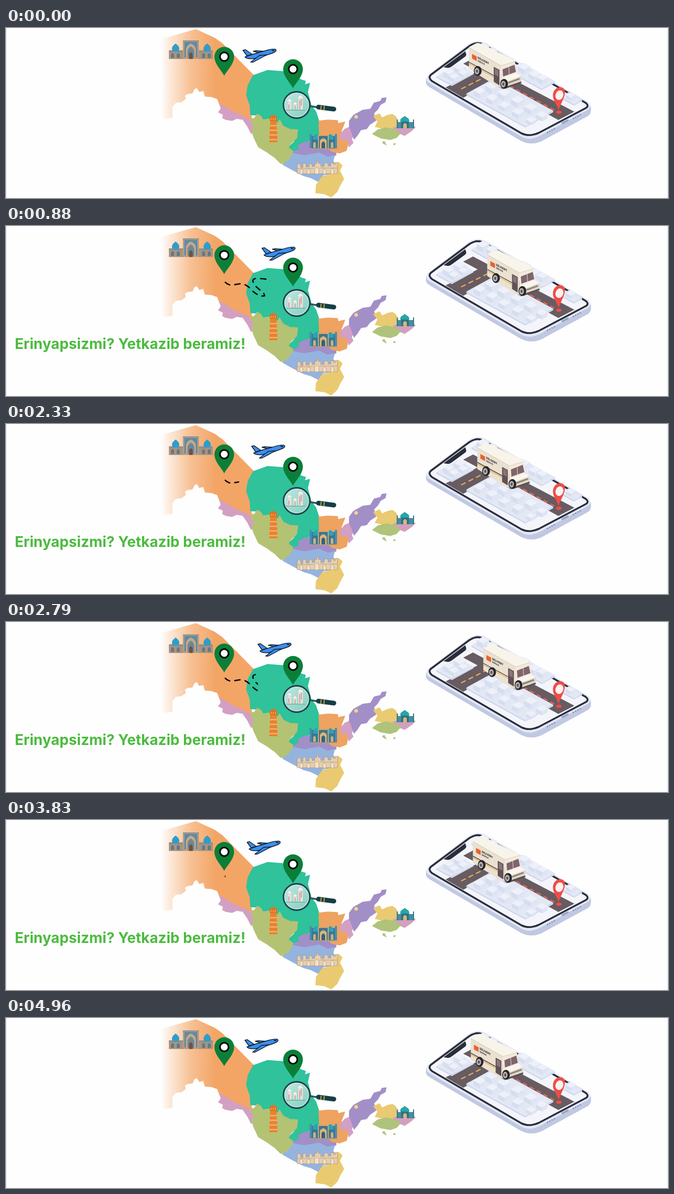
An HTML page that plays this animation: 1280 by 329 pixels, repeating every 5000 ms.

```html
<!DOCTYPE html>
<html lang="uz">
<head>
<meta charset="utf-8">
<title>Yetkazib berish</title>
<style>
html, body { margin: 0; width: 100%; height: 100%; overflow: hidden; background: #fefefe; }
svg { display: block; width: 100%; height: 100%; }
#slogan { font: 700 28.2px Inter, "Open Sans", sans-serif; fill: #4cbb3f; }
#map { stroke-width: 1.5; stroke-linejoin: round; }
.sign { font: 800 5.6px Inter, Roboto, sans-serif; fill: #2c2a30; }
</style>
</head>
<body>
<svg viewBox="0 0 1280 329" preserveAspectRatio="none">
<defs>
  <linearGradient id="fade" gradientUnits="userSpaceOnUse" x1="300" y1="0" x2="405" y2="0">
    <stop offset="0" stop-color="#fefefe"/><stop offset=".12" stop-color="#fdeee2"/>
    <stop offset=".55" stop-color="#f7c093"/><stop offset="1" stop-color="#f3a566"/>
  </linearGradient>
  <linearGradient id="glass" x1="0" y1="0" x2="1" y2="1">
    <stop offset="0" stop-color="#c5e6e0"/><stop offset="1" stop-color="#7fcfbd"/>
  </linearGradient>
  <clipPath id="wipe"><rect id="edge" x="400" y="90" width="0" height="60"/></clipPath>
  <g id="pin">
    <path d="M0 37C-4 28-19 15-19 0A19 19 0 0 1 19 0C19 15 4 28 0 37Z" fill="#0b7f38"/>
    <circle r="8.3" fill="#fff" stroke="#0a0a0a" stroke-width="3.2"/>
  </g>
  <g id="wheel">
    <ellipse rx="7.5" ry="9.5" fill="#26242a"/>
    <ellipse cx="-1.5" cy=".5" rx="4.5" ry="6.3" fill="#b9b4b4"/>
    <ellipse cx="-1.5" cy=".5" rx="2" ry="3" fill="#5b5558"/>
  </g>
</defs>

<path d="M.5 0V329M1279.5 0V329" stroke="#dcdcef"/>

<g id="map"></g>
<circle cx="677" cy="172" r="3.5" fill="#f3d684"/>

<!-- palace with two blue domes -->
<g>
  <path d="M315 43H342V60H315ZM373 43H400V60H373Z" fill="#a9947f"/>
  <path d="M342 24H373V60H342Z" fill="#b79c80"/>
  <path d="M345 27H370V57H345Z" fill="#5f8ba6"/>
  <path d="M348 58V40Q350 33 357.500 30Q365 33 367 40V58Z" fill="#c6a988"/>
  <path d="M351 58V44Q353 38 357.500 36Q362 38 364 44V58Z" fill="#6f8797"/>
  <path d="M354 60V50Q357.500 44 361 50V60Z" fill="#6d5546"/>
  <path d="M322 45C319 37 323 34 328 30C333 34 337 37 334 45ZM383 45C380 37 384 34 389 30C394 34 398 37 395 45Z" fill="#2f9dca"/>
  <path d="M319 58V51Q322 46 325 51V58ZM330 58V51Q333 46 336 51V58ZM379 58V51Q382 46 385 51V58ZM390 58V51Q393 46 396 51V58Z" fill="#64798a"/>
  <path d="M315 46H342M373 46H400M342 25H373" stroke="#7d8f9a" stroke-width="1.500"/>
</g>

<!-- minaret -->
<g>
  <path d="M511 178H523L525 221H509Z" fill="#e8822d"/>
  <path d="M510 171L517 168L524 171V180H510Z" fill="#de7423"/>
  <path d="M510.500 189H523.500M510 198H524M509.500 207H524.500M509 216H525" stroke="#f2b27a" stroke-width="2.500"/>
  <path d="M512 176H522" stroke="#f0a35e" stroke-width="3" stroke-dasharray="2 2"/>
</g>

<!-- blue ensemble -->
<g>
  <path d="M588 209H639V234H588Z" fill="#3a7894"/>
  <path d="M587 205H591V234H587ZM636 205H640V234H636Z" fill="#4a8db0"/>
  <path d="M594 216C591 210 596 208 600 205C604 208 609 210 606 216ZM621 216C618 210 623 208 627 205C631 208 636 210 633 216Z" fill="#2ba2b8"/>
  <path d="M603 207H624V234H603Z" fill="#d9a55e"/>
  <path d="M605 209H622V233H605Z" fill="#3d7594"/>
  <path d="M607 234V218Q613.500 209 620 218V234Z" fill="#d8b679"/>
  <path d="M610 234V223Q613.500 216 617 223V234Z" fill="#35617f"/>
  <path d="M594 232V223Q596.500 218 599 223V232ZM628 232V223Q630.500 218 633 223V232Z" fill="#c9b184"/>
  <path d="M587 233.500H640" stroke="#b99e72" stroke-width="1.500"/>
</g>

<!-- old town skyline -->
<g stroke="#a98b6c" stroke-width=".7">
  <path d="M563 282V266L566 261L570 266V270H574V262H580V269H586V265Q589 259 592 265V268H597V262H601V257H604V262H609V268H615V264Q619 257 623 264V267H628V261H633V264H637V260H641V282Z" fill="#e6cfb1"/>
  <path d="M568 282V275Q571 271 574 275V282M582 282V275Q585 271 588 275V282M597 282V273Q601 267 605 273V282M613 282V275Q616 271 619 275V282M628 282V274Q631 270 634 274V282M563 272H596M606 271H641" fill="#f2e2c8"/>
</g>

<!-- teal mosque -->
<g>
  <path d="M756 182H789V194H756Z" fill="#478e9d"/>
  <path d="M763 182C760 175 767 174 771 170C775 174 782 175 779 182Z" fill="#27a6a9"/>
  <path d="M756.500 177V194M788 177V194" stroke="#2b7b8c" stroke-width="2"/>
  <path d="M764 181H779V194H764Z" fill="#2f7187"/>
  <path d="M768 194V187Q771.500 181 775 187V194Z" fill="#d7b779"/>
</g>

<!-- phone -->
<g stroke-linejoin="round">
  <path d="M812 98V106Q813 112 823 117L995 218Q1014 228 1034 220L1124 171Q1131 167 1131 160V152Z" fill="#c0c8e2"/>
  <path d="M816 91L893 32Q911 20 928 29L1124 142Q1136 151 1124 159L1032 209Q1012 219 996 210L819 107Q808 100 816 91Z" fill="#e4e7f5"/>
  <path d="M821 91L896 35Q911 25 925 33L1121 145Q1128 151 1121 155L1030 203Q1012 211 997 204L824 103Q816 97 821 91Z" fill="#f4f5fb" stroke="#2a2d3a" stroke-width="3.600"/>
  <path d="M846 76L888 45L890 51Q890 54 887 56L861 75Q856 78 853 77Z" fill="#2a2d3a"/>
  <path d="M992 72L1003 78.500" stroke="#2a2d3a" stroke-width="5"/>
  <path d="M850 115L884 135L938 107L1068 178L1099 162L903 59L884 69L912 84Z" fill="#665c61"/>
  <path d="M880 118L934 91" stroke="#f0a55b" stroke-width="2.400" stroke-dasharray="10 6"/>
  <path d="M934 90L1066 162" stroke="#ef6454" stroke-width="2.400" stroke-dasharray="9 6"/>
  <g id="blocks"></g>
  <path d="M1076 184L1086 179" stroke="#9ba4c6" stroke-width="4" stroke-linecap="round"/>
  <path d="M1047 202L1062 194M1097 175L1114 166" stroke="#8790b5" stroke-width="3" stroke-linecap="round" stroke-dasharray="0 5"/>
</g>
<ellipse cx="1069" cy="163" rx="5.500" ry="3.200" fill="#ef4d47"/>

<g id="truck" stroke-linejoin="round">
  <path d="M897 79L960 119L998 104L940 80Z" fill="#463f45" opacity=".4"/>
  <path d="M895 37L908 30Q912 28 917 30L981 61Q985 63 984 67L956 77Z" fill="#f8f4ea"/>
  <path d="M895 37L957 72V115L949 113L895 79Z" fill="#eae1d1"/>
  <path d="M957 74L984 65L988 88L995 93V106L963 117L957 113Z" fill="#f2eadc"/>
  <path d="M960 80L983 71L986 85L961 94Z" fill="#80656c"/>
  <path d="M972 75L973 90" stroke="#e9dfce"/>
  <path d="M961 96L987 87L996 93L967 104Z" fill="#faf6ee"/>
  <path d="M967 104L996 93V102L966 113Z" fill="#e0d6c5"/>
  <path d="M943 75L954 81V111L943 104Z" fill="#5f5156"/>
  <path d="M945 78L952 82V94L945 90Z" fill="#8d747a"/>
  <path d="M895 66L943 92" stroke="#3a3437" stroke-width="1.300"/>
  <path d="M895 69L943 95" stroke="#eaa74a" stroke-width="1.200"/>
  <path d="M895 38L957 73L984 65" fill="none" stroke="#d6cbb9"/>
  <path d="M971 106L993 98" stroke="#8a7f7a" stroke-width="3"/>
  <path d="M964 116L996 105" stroke="#5a5152" stroke-width="3.500"/>
  <use href="#wheel" x="912" y="83"/><use href="#wheel" x="963" y="108"/>
  <path d="M901 50L910 55V64L901 59Z" fill="#e8622f"/>
  <g class="sign" transform="matrix(.78 .42 0 1 912 59)"><text>DELIVERY</text><text y="5.500" font-size="4">SERVICE</text></g>
</g>

<path d="M1068 159C1067 149 1055 139 1058 126C1061 115 1073 111 1079 118C1085 127 1074 144 1068 159Z" fill="#ef4d47"/>
<ellipse cx="1070" cy="130" rx="7.500" ry="9.500" transform="rotate(18 1070 130)" fill="#fbf3f1"/>

<!-- magnifier -->
<g>
  <path d="M587 151L606 154" stroke="#35555c" stroke-width="3.500"/>
  <path d="M604 153L634 157" stroke="#153f45" stroke-width="9" stroke-linecap="round"/>
  <path d="M609.500 150L608.500 159M615.500 150.500L614.500 160" stroke="#d9b75b" stroke-width="1.700"/>
  <circle cx="562" cy="149" r="25.500" fill="url(#glass)" stroke="#203d49" stroke-width="2.800"/>
  <circle cx="562" cy="149" r="23" fill="none" stroke="#d7f0ea" stroke-opacity=".45" stroke-width="2"/>
  <path d="M545 158V143H552V158ZM565 158V134H574V158ZM556 158V147H562V158Z" fill="#e6e0dd"/>
  <path d="M544 142L548 137L553 142ZM564 135L569 130L575 135ZM555 147L559 143L563 147Z" fill="#f4f4f1"/>
  <path d="M547 148V157M568 140V157M571 137V150M559 150V158" stroke="#cf9a97" stroke-width="1.800"/>
  <path d="M542 159H578" stroke="#76bdae" stroke-width="2"/>
</g>

<path clip-path="url(#wipe)" d="M424 109C433 118 441 113 451 112C463 111 470 118 476 125C485 133 491 137 500 135C500 128 487 123 480 113C472 100 484 101 495 102C511 103 515 108 520 116C526 128 538 134 556 134" fill="none" stroke="#080808" stroke-width="2.600" stroke-linecap="round" stroke-dasharray="10 10"/>

<g id="pins"><use href="#pin" x="422" y="55.500"/><use href="#pin" x="555" y="79.500"/></g>

<g id="plane" stroke="#101622" stroke-width="1.400" stroke-linejoin="round" fill="#3a8fee">
  <path d="M489 48L478 45L483 44L499 45Z"/>
  <path d="M466 54L458 43L463 42L476 51Z"/>
  <path d="M462 56Q478 50 494 46Q512 40 520 41Q525 43 519 47Q502 54 480 59Q466 61 462 56Z"/>
  <path d="M490 53L473 66L478 66L504 52Z"/>
  <path d="M514 43L519 44" stroke="#0c1c38" stroke-width="2"/>
</g>

<text id="slogan" x="17" y="238.300" opacity="0">Erinyapsizmi? Yetkazib beramiz!</text>
</svg>

<script>
const $ = id => document.getElementById(id);
const LOOP = 5000;

// Regions: fill and outline
const regions = [
  ['url(#fade)', 'M300 22L367 3L404 20L418 30L481 94L468 112L466 130L473 148L474 170L479 188L458 173L440 165L425 156L413 148L409 137L398 133L385 132L382 121L374 123L369 115L364 118L360 126L351 127L345 131L347 137L339 143L328 144L321 153V173L311 175L300 174Z'],
  ['#d39fc2', 'M413 147L425 154L440 163L458 171L468 175L475 179L480 199L474 204L467 190L458 177L446 175L437 179L425 177L419 174L420 167L411 163L416 156Z'],
  ['#2fc29b', 'M478 92L506 82L545 85L570 100L579 103L577 110L587 107L583 124L590 150L599 162L605 180L606 206L592 215L577 223L566 237L552 240L545 231L556 222L562 213L565 198L548 195L537 190L528 178L524 184L498 179L492 169L473 168L472 150L465 130L468 111Z'],
  ['#b4c274', 'M472 178L481 174L485 167L492 170L497 178L508 176L526 184L529 178L536 190L549 196L564 197L562 213L549 225L546 232L557 240L552 249L540 262L531 262L520 251L503 239L488 230L480 213L476 202L479 188Z'],
  ['#a28fc8', 'M555 240L566 236L566 227L577 221L592 220L606 207L625 231L638 235L638 246L622 250L606 243L585 248L560 246Z'],
  ['#eea361', 'M605 180L622 178L641 179L642 185L655 182L648 200L650 211L662 221L658 237L645 242L630 239L620 229L606 207Z'],
  ['#d2a0c4', 'M646 206L655 196L668 190L674 204L668 215L671 222L663 230L661 218L646 213Z'],
  ['#a28fc8', 'M664 191L664 180L672 169L690 159L705 157L712 145L724 142L727 136L735 135L733 143L724 148L718 158L711 165L715 179L703 187L697 195L686 197L679 208L673 215L669 203Z'],
  ['#eaca72', 'M711 171L722 166L727 174L738 169L747 167L753 171L758 180L756 192L740 195L729 194L714 191L719 181Z'],
  ['#d39fc0', 'M748 194L762 189L776 187L791 192L784 199L771 208L761 204Z'],
  ['#b0c37a', 'M709 205L719 197L735 193L750 196L763 203L755 212L743 216L725 213ZM728 222L731 219L735 226ZM749 225L752 223L752 226Z'],
  ['#95b3df', 'M535 264L547 256L556 243L577 247L605 242L622 250L635 247L632 258L642 266L632 282L613 284L606 298L590 290L576 286L555 275Z'],
  ['#eaca70', 'M632 263L643 260L650 266L645 276L653 292L646 304L640 317L629 327L616 321L599 319L600 304L612 287L630 283Z']
];
$('map').innerHTML = regions.map(([fill, d]) => `<path d="${d}" fill="${fill}" stroke="${fill}"/>`).join('');

// Isometric city blocks: a slab with small houses on it
const box = (x, y, w, d, h, top, left, right) => {
  const a = w * .55, b = d * .55;
  return `<path d="M${x} ${y - h}l${w} ${a}v${h}l${-w} ${-a}z" fill="${left}"/>
    <path d="M${x + w} ${y - h + a}l${d} ${-b}v${h}l${-d} ${b}z" fill="${right}"/>
    <path d="M${x} ${y - h}l${w} ${a}l${d} ${-b}l${-w} ${-a}z" fill="${top}"/>`;
};
const slab = (x, y, w, d) => box(x, y, w, d, 3, '#e3e8f5', '#cdd6eb', '#d5dcef');
const house = (x, y, s, h) => box(x, y, s, s, h, '#eef1fa', '#d6deef', '#dfe5f3');
$('blocks').innerHTML =
  slab(832, 96, 30, 42) + house(845, 94, 11, 10) + house(866, 84, 12, 9) + house(856, 100, 10, 7) + house(874, 92, 10, 7) +
  slab(900, 48, 34, 24) + house(910, 45, 12, 10) + house(928, 53, 11, 9) +
  slab(970, 84, 66, 26) + house(990, 83, 12, 9) + house(1010, 96, 12, 8) + house(1026, 104, 11, 9) +
  slab(1072, 136, 26, 16) + house(1083, 136, 9, 6) +
  slab(890, 130, 114, 54) +
  [[904, 130, 12, 9], [926, 122, 13, 11], [928, 143, 12, 9], [950, 134, 13, 10], [952, 156, 12, 8],
   [976, 148, 13, 10], [978, 170, 12, 9], [1002, 162, 13, 10], [1005, 183, 10, 6], [1025, 175, 11, 8]]
    .map(v => house(...v)).join('');

const clamp = v => Math.min(1, Math.max(0, v));
// Triangle wave 0..1..0, n cycles per loop
const swing = (t, n) => 1 - Math.abs(1 - 2 * (t * n / LOOP % 1));
const move = (id, x, y) => $(id).setAttribute('transform', `translate(${x} ${y})`);

function draw(now) {
  const t = now % LOOP;
  const run = 62.5 * swing(t, 4);
  move('plane', run, 0);
  move('truck', run * .96, run * .48);
  $('edge').setAttribute('width', run * 3);
  move('pins', 0, 7.5 * swing(t, 6));

  const enter = 1 - (1 - clamp((t - 20) / 500)) ** 3;
  const leave = clamp((t - 4520) / 420);
  move('slogan', 0, 52 * (1 - enter) + 9 * leave);
  $('slogan').setAttribute('opacity', enter * (1 - leave));
  requestAnimationFrame(draw);
}
requestAnimationFrame(draw);
</script>
</body>
</html>
```
